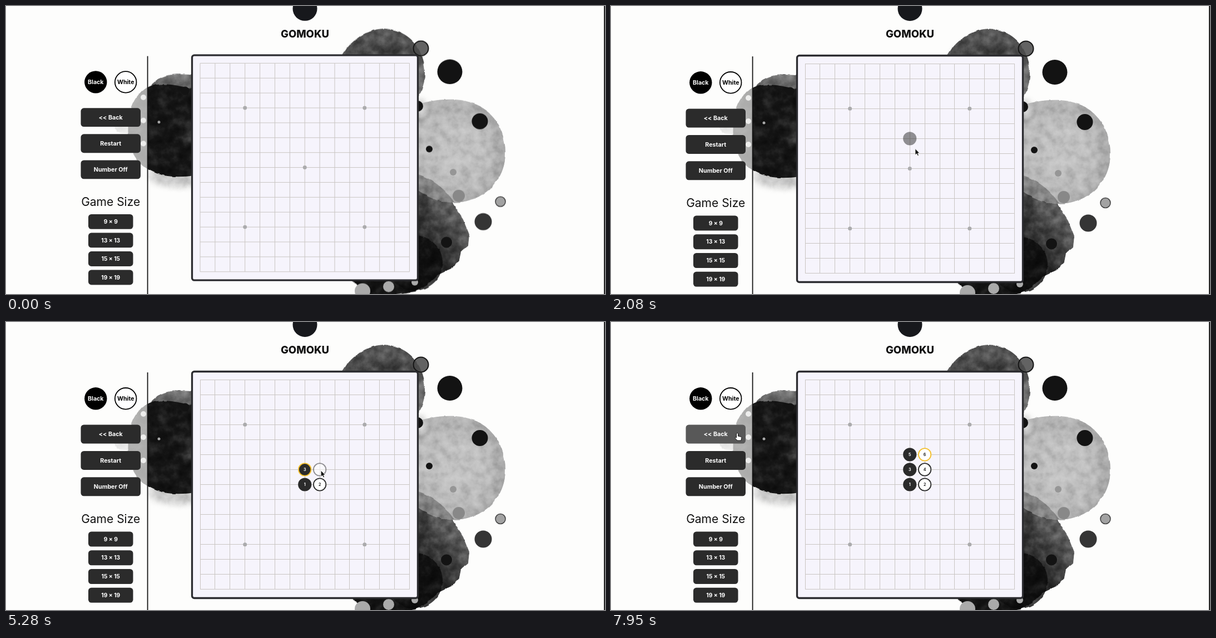
Animation, 1077 px wide and 520 px high, one loop 8 s. Source, as an HTML page:

```html
<!DOCTYPE html>
<html lang="en">
<head>
<meta charset="utf-8">
<title>Gomoku</title>
<style>
  html, body { margin: 0; width: 100%; height: 100%; overflow: hidden; background: #fdfdfc; }
  svg { position: absolute; left: 0; top: 0; width: 100%; height: 100%; }
  #art { will-change: transform; }
  text { font-family: Inter, "Open Sans", sans-serif; text-anchor: middle; }
  .bold { font-weight: 700; fill: #fff; }
  .button { fill: #2b2b2b; }
  .button.hot { fill: #585858; }
  #grid { stroke: #c9c5c2; stroke-width: 1; shape-rendering: crispEdges; }
</style>
</head>
<body>
<svg id="art" viewBox="0 0 1077 520" preserveAspectRatio="none">
  <defs>
    <filter id="wash" filterUnits="userSpaceOnUse" x="0" y="0" width="1077" height="540" color-interpolation-filters="sRGB">
      <feTurbulence type="fractalNoise" baseFrequency=".055" numOctaves="5" seed="8" result="noise"/>
      <feColorMatrix in="noise" values="1 0 0 0 0  0 1 0 0 0  0 0 1 0 0  0 0 0 0 1" result="offset"/>
      <feDisplacementMap in="SourceGraphic" in2="offset" scale="4" xChannelSelector="R" yChannelSelector="G" result="shape"/>
      <feColorMatrix in="noise" values=".7 0 0 0 .15  .7 0 0 0 .15  .7 0 0 0 .15  0 0 0 0 1" result="tone"/>
      <feBlend in="tone" in2="shape" mode="soft-light"/>
      <feComposite operator="in" in2="shape"/>
    </filter>
    <filter id="soft" x="-50%" y="-50%" width="200%" height="200%"><feGaussianBlur stdDeviation="7"/></filter>
    <linearGradient id="topInk" x1="0" y1="0" x2=".3" y2="1">
      <stop offset="0" stop-color="#616161"/><stop offset=".4" stop-color="#4a4a4a"/><stop offset="1" stop-color="#777"/>
    </linearGradient>
    <radialGradient id="paleInk" cx=".45" cy=".5" r=".56">
      <stop offset="0" stop-color="#c4c4c4"/><stop offset=".75" stop-color="#b9b9b9"/><stop offset="1" stop-color="#a6a6a6"/>
    </radialGradient>
    <linearGradient id="lowInk" x1=".4" y1=".7" x2="1" y2=".3">
      <stop offset="0" stop-color="#151515"/><stop offset=".45" stop-color="#2c2c2c"/><stop offset="1" stop-color="#717171"/>
    </linearGradient>
    <linearGradient id="leftWash" x1="0" y1="0" x2="0" y2="1">
      <stop offset="0" stop-color="#7c7c7c"/><stop offset=".3" stop-color="#555"/><stop offset="1" stop-color="#222"/>
    </linearGradient>
  </defs>
  <g id="ink">
    <g filter="url(#wash)">
      <ellipse cx="310" cy="308" rx="52" ry="18" fill="#ccc" opacity=".7" filter="url(#soft)"/>
      <ellipse cx="212" cy="219" rx="17" ry="12" fill="#bbb" opacity=".6"/>
      <path d="M252 152L275 132C292 122 315 123 340 126V240H270Z" fill="url(#leftWash)"/>
      <path d="M220 240C217 200 226 170 246 153C262 141 285 137 340 152V308C320 311 300 311 284 308C252 301 225 280 220 240Z" fill="#151515"/>
      <ellipse cx="328" cy="228" rx="12" ry="20" fill="#555" opacity=".5" filter="url(#soft)"/>
      <path d="M597 108C608 70 643 42 680 41C712 42 737 62 746 87C757 116 756 146 738 170H600Z" fill="url(#topInk)"/>
      <path d="M612 90C632 66 665 72 684 76C712 70 728 77 736 100Z" fill="#383838" opacity=".5" filter="url(#soft)"/>
      <path d="M735 304C770 313 790 335 803 357L822 387L833 415L831 436L818 447L815 462L800 478L776 489L758 506L735 519L660 530L616 495Z" fill="url(#lowInk)"/>
      <ellipse cx="735" cy="467" rx="50" ry="50" fill="#0c0c0c" opacity=".85"/>
      <path d="M735 181C758 173 780 169 808 170C865 173 898 216 898 268C897 320 857 356 806 357C778 357 752 345 735 330Z" fill="url(#paleInk)"/>
      <path d="M735 304C770 314 793 337 806 357C778 357 752 345 735 332Z" fill="#858585"/>
      <ellipse cx="745" cy="187" rx="11" ry="14" fill="#eee" opacity=".7" filter="url(#soft)"/>
    </g>
    <g fill="#131313">
      <circle cx="798" cy="119.5" r="22.5"/>
      <circle cx="852" cy="209.5" r="14.5"/>
      <circle cx="740" cy="182" r="10"/>
      <circle cx="792" cy="429.5" r="10"/>
      <circle cx="322" cy="154" r="7.5"/>
      <circle cx="761" cy="260" r="6"/>
    </g>
    <circle cx="858" cy="392" r="15.5" fill="#353535"/>
    <circle cx="814" cy="345" r="11" fill="#888"/>
    <circle cx="804" cy="302" r="6" fill="#969696"/>
    <circle cx="746" cy="77" r="13.5" fill="#484848" fill-opacity=".85" stroke="#151515" stroke-width="2"/>
    <circle cx="889" cy="355.5" r="9" fill="#a2a2a2" stroke="#444" stroke-width="1.6"/>
    <g id="specks"></g>
  </g>
</svg>
<svg id="game" viewBox="0 0 1077 520" preserveAspectRatio="none">
  <g id="page">
    <rect y="91" width="254" height="440" fill="#fdfdfc" opacity=".66"/>
    <path d="M254.6 91V540" stroke="#151515" stroke-width="1.8"/>
    <path d="M1076 0V540" stroke="#222" stroke-width="2"/>
    <circle cx="537.5" cy="5" r="22" fill="#17181c"/>
    <text x="537.5" y="57.3" font-size="18.5" font-weight="800" fill="#111">GOMOKU</text>
    <g id="panel"></g>
    <rect x="334.5" y="89.5" width="406" height="409" rx="4" fill="#f6f4fc" stroke="#2b2b2f" stroke-width="3.3"/>
    <path id="grid"/>
    <g id="stars" fill="#ababad"></g>
    <g id="stones"></g>
  </g>
  <path id="arrow" d="M0 0V11.5L2.7 9.2L4.5 13L6.5 12.1L4.8 8.3H8.2Z" fill="#111" stroke="#fff" stroke-width=".9"/>
  <path id="hand" d="M-1 0C0 -1 1.5 -.5 1.5 1V5L6 6C7.5 6.4 8 7.2 7.8 8.5L7 13H0L-3.7 8.7C-4.4 7.4 -3 6.4 -1.5 8V1Z" fill="#fff" stroke="#111" stroke-width="1"/>
</svg>
<script>
const $ = id => document.getElementById(id);
const LOOP = 8000, RESIZE = 910, HOVER_LAG = 25, SIZE = 15;
const STEP_X = 26.89, STEP_Y = 27.07;
const colX = c => 349 + c * STEP_X, rowY = r => 104 + r * STEP_Y;
const repeat = (n, make) => Array.from({ length: n }, (_, i) => make(i)).join('');
const dot = (x, y, r, fill) => `<circle cx="${x}" cy="${y}" r="${r}" ${fill ? `fill="${fill}"` : ''}/>`;
const label = (x, y, text, size, look = 'class="bold"') =>
  `<text x="${x}" y="${y}" font-size="${size}" ${look}>${text}</text>`;
const button = (x, y, w, h, text, size) =>
  `<rect class="button" x="${x}" y="${y}" width="${w}" height="${h}" rx="5.5"/>` +
  label(x + w / 2, y + h / 2 + size * .36, text, size);

$('specks').innerHTML =
  repeat(3, i => dot(247, 166 + 42 * i, 5, '#ccc')) +
  repeat(3, i => dot(641 + 47 * i, 518 - 8 * i, 14 - 4 * i, '#aaa')) +
  dot(275, 211, 2.5, '#aaa');

const mainButtons = ['&lt;&lt; Back', 'Restart', 'Number Off'], sizes = [9, 13, 15, 19];
$('panel').innerHTML =
  dot(161.3, 138.3, 20.2) + label(161.3, 142.1, 'Black', 10.6) +
  '<circle cx="215.2" cy="138.3" r="19.3" fill="#fff" stroke="#000" stroke-width="1.8"/>' +
  label(215.2, 142.1, 'White', 10.6, 'font-weight="700"') +
  repeat(3, i => button(134.5, 185.5 + i * 47.4, 107.5, 34, mainButtons[i], 10.7)) +
  label(188.2, 363, 'Game Size', 21, 'fill="#111"') +
  repeat(4, i => button(148, 378.5 + i * 33.75, 80.5, 27, `${sizes[i]} × ${sizes[i]}`, 10.3));
const back = document.querySelector('.button');

$('grid').setAttribute('d', repeat(SIZE, i =>
  `M${colX(i)} ${rowY(0)}V${rowY(SIZE - 1)}M${colX(0)} ${rowY(i)}H${colX(SIZE - 1)}`));
$('stars').innerHTML = dot(colX(7), rowY(7), 3.5) +
  repeat(4, i => dot(colX(i % 2 ? 11 : 3), rowY(i < 2 ? 3 : 11), 3.5));

// Black climbs one column, white answers in the next one
const cellOf = i => [7 + i % 2, 7 - (i >> 1)];
const restAt = i => { const [c, r] = cellOf(i); return [colX(c) + 2, rowY(r) + 1.5]; };

// Each trip: pointer leaves, pointer arrives, stone is placed
const trips = [
  [1780, 2290, 2930], [3260, 3440, 3700], [4080, 4360, 4620],
  [4700, 5280, 5480], [5720, 6040, 6480], [6620, 7020, 7230], [7450, 7950, Infinity]
];
const stops = [[585, 72], ...trips.slice(0, -1).map((_, i) => restAt(i)), [227, 201]];

function pointer(t) {
  const i = Math.max(0, trips.findLastIndex(trip => trip[0] <= t));
  const [leave, arrive] = trips[i];
  const k = Math.min(1, Math.max(0, (t - leave) / (arrive - leave)));
  const eased = 1 - (1 - k) ** 2;
  return stops[i].map((from, axis) => from + (stops[i + 1][axis] - from) * eased);
}

function stone([c, r], white, number, last) {
  const x = colX(c), y = rowY(r);
  return `<circle cx="${x}" cy="${y}" r="11.2" fill="${white ? '#fff' : '#2b2b2b'}" ` +
    `stroke="${last ? '#f3bf2b' : '#2b2b2b'}" stroke-width="1.8" ${number ? '' : 'opacity=".5"'}/>` +
    (number ? label(x, y + 2.5, number, 7, `font-weight="700" fill="${white ? '#222' : '#fff'}"`) : '');
}

function hoverCell(t) {
  const [x, y] = pointer(t - HOVER_LAG);
  return [Math.round((x - colX(0)) / STEP_X), Math.round((y - rowY(0)) / STEP_Y)];
}

let shown = '';
function draw(t) {
  const squash = `scale(1 ${t < RESIZE ? .9934 : 1})`;
  $('page').setAttribute('transform', squash);
  $('ink').setAttribute('transform', squash);

  const visible = t >= trips[0][0];
  const count = trips.filter(trip => trip[2] <= t).length;
  let html = repeat(count, i => stone(cellOf(i), i % 2, i + 1, i === count - 1));
  const cell = hoverCell(t);
  const onBoard = cell.every(v => v >= 0 && v < SIZE);
  const taken = Array.from({ length: count }, (_, i) => `${cellOf(i)}`).includes(`${cell}`);
  if (visible && onBoard && !taken) html += stone(cell, count % 2);
  if (html !== shown) $('stones').innerHTML = shown = html;

  const [x, y] = pointer(t);
  const hot = visible && x > 134 && x < 242 && y > 185 && y < 220;
  back.classList.toggle('hot', hot);
  for (const [id, on] of [['arrow', visible && !hot], ['hand', hot]]) {
    $(id).setAttribute('visibility', on ? 'visible' : 'hidden');
    $(id).setAttribute('transform', `translate(${x} ${y})`);
  }
}

const start = performance.now();
function tick() {
  draw((performance.now() - start) % LOOP);
  requestAnimationFrame(tick);
}
tick();
</script>
</body>
</html>
```
